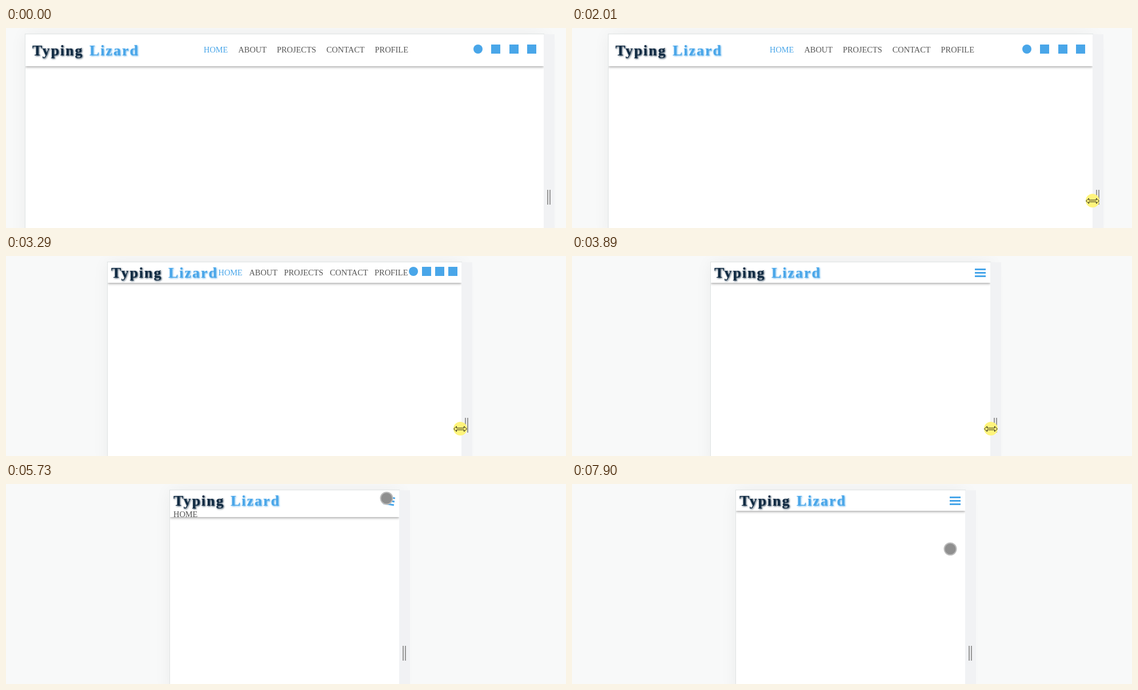
An HTML page that plays this animation: 980x351 px, repeating every 8 s.

```html
<!DOCTYPE html>
<html lang="en">
<head>
<meta charset="utf-8">
<title>Responsive navbar</title>
<style>
html, body { margin: 0; width: 100%; height: 100%; overflow: hidden; background: #f8f9f9; }
body { position: relative; font: 14.4px "Liberation Serif", "Times New Roman", serif; color: #555; }
#page { position: absolute; top: 11px; height: 360px; background: #fff;
  box-shadow: 0 0 0 1px #dfe3e3, 0 0 28px rgba(0, 0, 0, .06); }
#strip { position: absolute; top: 0; left: 100%; width: 19px; height: 100%; }
#strip::after { content: ""; position: absolute; left: 6px; top: 273px; width: 2px; height: 26px;
  border: solid #999; border-width: 0 2px; }
header { --row: 56px; position: relative; display: flex; justify-content: space-between;
  height: var(--row); padding: 0 12px; line-height: var(--row); overflow: hidden;
  box-shadow: 0 2px 4px rgba(0, 0, 0, .32); clip-path: inset(0 0 -8px); }
header > * { flex: none; }
.logo { display: flex; justify-content: space-between; width: 187px; height: var(--row);
  position: relative; top: 1px;
  font-size: 26px; font-weight: bold; letter-spacing: 2px; color: #102a42; }
.logo span { text-shadow: 1px 1px 3px currentColor; }
.logo span + span, .on { color: #49a6e9; }
nav { display: flex; gap: 18px; position: relative; top: -1px; }
.icons { display: flex; justify-content: space-between; align-items: center;
  width: 112px; height: var(--row); position: relative; top: -2px; }
.icons i { width: 16px; height: 16px; margin: 0 1px; background: #49a6e9; }
.icons i:first-child { border-radius: 50%; }
.burger { display: none; position: absolute; right: 8px; top: 11px; width: 19px; height: 3px;
  background: #49a6e9; box-shadow: 0 6px #49a6e9, 0 12px #49a6e9; transform-origin: 9.5px 7.5px; }
.compact { --row: 36px; padding: 0 6px; }
.compact nav { gap: 11.5px; top: 0; }
.compact .icons { width: 87px; }
.menu nav { position: absolute; left: 6px; top: 31px; display: block; line-height: 22.4px; }
.menu .icons { display: none; }
.menu .burger { display: block; }
.menu .on { color: inherit; }
#cursor { position: absolute; left: 0; top: 0; width: 1px; height: 1px; overflow: visible; }
#press { mix-blend-mode: multiply; }
</style>
</head>
<body>
<div id="page">
  <header id="bar">
    <div class="logo"><span>Typing</span><span>Lizard</span></div>
    <nav><div class="on">HOME</div><div>ABOUT</div><div>PROJECTS</div><div>CONTACT</div><div>PROFILE</div></nav>
    <div class="icons"><i></i><i></i><i></i><i></i></div>
    <div class="burger" id="burger"></div>
  </header>
  <div id="strip"></div>
</div>
<svg id="cursor">
  <path id="resize" d="M-11.5 .5l5-4.5v3h13v-3l5 4.5-5 4.5v-3h-13v3z" fill="#fff" stroke="#222"/>
  <circle id="press" r="12" fill="#fff47c"/>
  <circle id="touch" r="10.5" fill="#8f8f8f" stroke="#bbb" stroke-width="2"/>
  <path id="arrow" d="M.5.5v16l3.7-3.5 2.6 6 2.8-1.2-2.6-5.8h4.7z" fill="#fff" stroke="#222"/>
</svg>
<script>
const LOOP = 8000, STEP = 66.7;
const $ = id => document.getElementById(id);
const ramp = (t, start, length) => Math.min(1, Math.max(0, (t - start) / length));
const ease = p => p * p * (3 - 2 * p);
const arc = p => Math.sin(Math.PI * p);

// Cursor moves: start, length, dx, dy
const toHandle = [260, 410, 0, -61];
const toBurger = [4830, 730, -28, -278];
const leave = [5720, 420, 120, 7];
const comeBack = [6534, 360, -122, -7];
const goDown = [7260, 600, 0, 89];
const moves = [toHandle, toBurger, leave, comeBack, goDown];

function show(id, on) { $(id).style.display = on ? "" : "none"; }

function draw(now) {
  const t = now % LOOP;
  const q = Math.floor((t + 10) / STEP) * STEP - 10;
  const drag = ramp(q, 1445, 2800);
  const left = Math.round(34 + 253 * drag ** 1.3), right = 975 - left, width = right - left;
  $("page").style.left = left + "px";
  $("page").style.width = width + "px";
  $("strip").style.background = t >= 1390 && t < 1800 ? "#dee1e6" : "#f1f2f4";

  const menu = width < 612;
  $("bar").className = (width < 685 ? "compact " : "") + (menu ? "menu" : "");
  const open = ease(ramp(q, 5660, 330)) - ease(ramp(q, 7110, 330));
  $("bar").style.height = menu ? 36 + 107 * open + "px" : "";
  $("burger").style.transform = `rotate(${90 * open}deg)`;

  // The cursor holds the handle with a slight lag, then bows left on its way to the burger
  let x = right + 4 - 7 * arc(drag) - 33 * arc(ramp(q, toBurger[0], toBurger[1]));
  let y = 364;
  for (const [start, length, dx, dy] of moves) {
    const p = ramp(q, start, length);
    x += dx * p;
    y += dy * p;
  }
  const dragging = t < 4830, inside = x < right, out = x > right + 19;
  $("cursor").style.transform = `translate(${Math.round(x)}px, ${Math.round(y)}px)`;
  show("resize", dragging || !inside && !out);
  show("press", t >= 1060 && t < 4500);
  show("touch", !dragging && inside);
  show("arrow", !dragging && out);
}

const begin = performance.now();
function loop() {
  draw(performance.now() - begin);
  requestAnimationFrame(loop);
}
loop();
</script>
</body>
</html>
```
